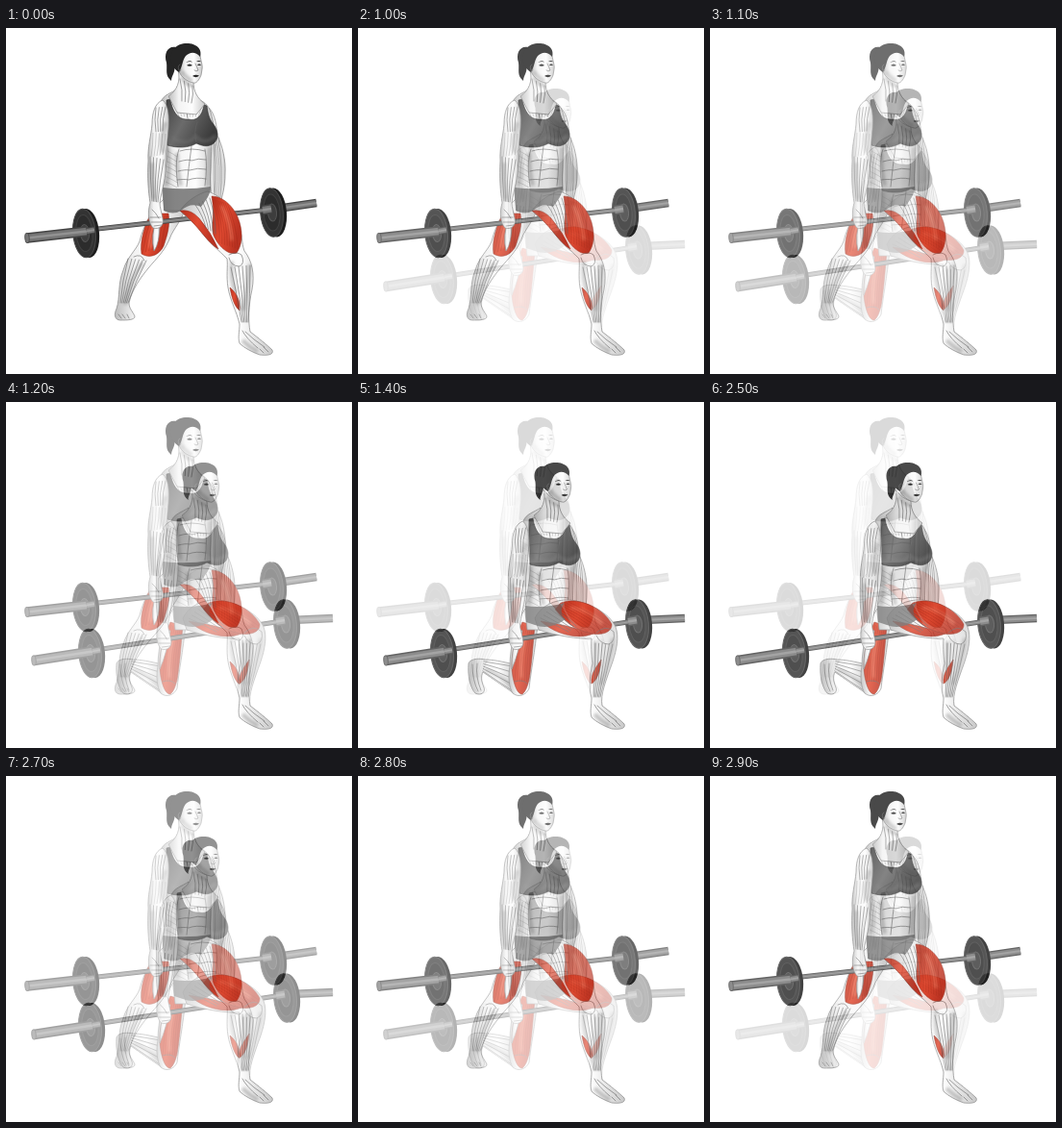
Write an HTML page that moves like this. It is 360 px wide and 360 px high and loops after 3 s.

```html
<!DOCTYPE html>
<html lang="en">
<head>
<meta charset="utf-8">
<title>Barbell split squat</title>
<style>
  html, body { margin: 0; width: 100%; height: 100%; overflow: hidden; background: #fff; }
  svg { display: block; width: 100vw; height: 100vh; }
  .skin { fill: url(#skin); stroke: #858585; stroke-width: .7; }
  .red { fill: url(#red); stroke: #8d2a1c; stroke-width: .5; }
  .dark { fill: url(#cloth); stroke: #2c2c2c; stroke-width: .6; }
  .hair { fill: #252525; }
  .ink { fill: none; stroke: #666; stroke-width: .6; stroke-linecap: round; }
  .fine { fill: none; stroke: #777; stroke-width: .45; opacity: .75; }
  .fibre { fill: none; stroke: #8e2115; stroke-width: .5; opacity: .55; }
  .glow { fill: none; stroke: #f98b70; stroke-width: 3; opacity: .6; filter: url(#soft); }
  .shade { fill: none; stroke: #777; stroke-width: 4; opacity: .4; filter: url(#soft); }
  .shorts { fill: #666; opacity: .78; }
</style>
</head>
<body>
<svg viewBox="0 0 360 360">
  <defs>
    <linearGradient id="skin">
      <stop offset="0" stop-color="#bcbcbc"/><stop offset=".28" stop-color="#f3f3f3"/>
      <stop offset=".65" stop-color="#fdfdfd"/><stop offset="1" stop-color="#c9c9c9"/>
    </linearGradient>
    <linearGradient id="red" x2="1" y2=".4">
      <stop offset="0" stop-color="#b52e1c"/><stop offset=".5" stop-color="#e04a31"/>
      <stop offset="1" stop-color="#b93221"/>
    </linearGradient>
    <linearGradient id="cloth" x2="1" y2=".5">
      <stop offset="0" stop-color="#434343"/><stop offset=".45" stop-color="#6b6b6b"/>
      <stop offset="1" stop-color="#3b3b3b"/>
    </linearGradient>
    <filter id="soft" x="-50%" y="-50%" width="200%" height="200%"><feGaussianBlur stdDeviation="1.4"/></filter>
  </defs>
  <g id="stand"></g>
  <g id="lunge"></g>
</svg>
<script>
const path = (type, d) => `<path class="${type}" d="${d}"/>`;
const move = (x, y, art) => `<g transform="translate(${x} ${y})">${art}</g>`;

// Evenly spread strands from segment a-b to segment c-d, bowed sideways.
function strands(type, [ax, ay, bx, by], [cx, cy, dx, dy], count, bow = 0) {
  let d = '';
  for (let i = 0; i < count; i++) {
    const k = i / (count - 1), mix = (p, q) => p + (q - p) * k;
    const x1 = mix(ax, bx), y1 = mix(ay, by), x2 = mix(cx, dx), y2 = mix(cy, dy);
    d += `M${x1} ${y1}Q${(x1 + x2) / 2 + bow} ${(y1 + y2) / 2} ${x2} ${y2}`;
  }
  return path(type, d);
}

const rod = (x1, y1, x2, y2, width) => [['#444', 1], ['#757575', .72], ['#929292', .25]]
  .map(([color, part]) => `<line x1="${x1}" y1="${y1}" x2="${x2}" y2="${y2}" stroke="${color}" stroke-width="${width * part}"/>`).join('');

const disc = (x, y, rx, ry, fill, stroke = 'none') =>
  `<ellipse rx="${rx}" ry="${ry}" transform="translate(${x} ${y}) rotate(-5)" fill="${fill}" stroke="${stroke}"/>`;

const plate = (x, y) => disc(x + 2, y, 12, 25.5, '#1d1d1d') + disc(x - 1.5, y, 11.8, 25.3, '#333', '#494949') +
  disc(x - 1.5, y, 8.6, 19, '#2c2c2c', '#414141') + disc(x - 1, y, 4.5, 9, '#3d3d3d', '#555');

function barbell(left, nearPlate, farPlate, right) {
  const [nx, ny] = nearPlate, [fx, fy] = farPlate;
  return rod(fx + 4, fy - 4, ...right, 8.5) + plate(fx, fy) +
    rod(nx + 8, ny - 4, fx - 5, fy - 3, 5) + rod(fx - 11, fy - 2.5, fx - 2, fy - 4, 10) +
    plate(nx, ny) + rod(...left, nx + 1, ny - 2, 10.5) + disc(left[0], left[1], 2.2, 5.1, '#777', '#505050') +
    rod(nx + 1, ny - 2, nx + 9, ny - 3.5, 7);
}

const head =
  path('hair', 'M177 20C168 18 164 27 167 36C168 44 165 49 172 55C172 49 177 46 175 39Z') +
  path('skin', 'M186 26C192 22 200 23 202 29C203 35 205 40 204 43L203 49C201 54 198 58 195 57C189 56 182 51 180 45C179 38 182 31 186 26Z') +
  path('shade', 'M183 45Q187 52 194 55') +
  path('hair', 'M172 36C169 22 179 15 190 16C200 17 204 23 202 30C197 24 191 25 187 29C183 34 184 40 180 46C176 43 173 41 172 36Z') +
  path('ink', 'M181 38q-3 1-1 6q2 2 2-1M197 37q2 4 3 7q-2 2-4 0') +
  path('hair', 'M187 36q4-3 7-.5q-3-1-7 .5M198 35q3-2 5 0M188 39q3-3 6 0q-3 1.5-6 0M199 38.5q2-2 4 0q-2 1.2-4 0') +
  path('hair', 'M194 50q3-2 7-.5q-3 3-7 .5');

const neck =
  path('skin', 'M179 44C182 55 178 65 169 71L178 88L198 90L207 79C199 73 195 66 195 56Q186 54 179 44Z') +
  path('shade', 'M183 51Q188 60 195 60') +
  strands('ink', [181, 53, 194, 60], [183, 76, 193, 78], 4, 2);

const torso =
  path('skin', 'M179 63C172 68 164 69 161 77C163 90 168 105 168 122C169 140 163 155 163 172L165 190L206 190L213 170C212 158 213 140 214 122C219 110 216 98 213 88C211 80 205 76 199 74L188 78Z') +
  path('shade', 'M168 124Q171 145 167 164M212 124Q210 145 210 165M178 130Q178 150 182 164') +
  path('ink', 'M171 73Q180 76 187 80Q197 77 207 80M187 80L189 94') +
  strands('fine', [174, 77, 204, 80], [180, 92, 200, 93], 8) +
  path('ink', 'M193 123Q190 145 188 165M181 128Q193 124 207 128M180 139Q190 136 193 138Q200 135 208 137M179 149Q187 147 191 148Q199 145 208 147M178 158Q186 157 190 158Q198 155 208 157') +
  path('ink', 'M180 126C176 138 177 150 179 165M207 126Q210 142 207 164') +
  strands('fine', [168, 128, 166, 160], [178, 134, 178, 166], 7, 1) +
  path('dark', 'M167 75L171 74C173 88 180 96 190 95C198 97 204 92 206 80L209 81C210 88 211 94 215 99C221 106 222 115 216 120C210 125 203 122 198 120C190 125 178 125 168 122C169 108 166 92 167 75Z') +
  path('shade', 'M173 114Q188 124 197 113Q207 123 218 112') +
  path('ink', 'M198 119Q195 108 199 98');

const nearArm =
  path('skin', 'M163 75C155 78 152 88 152 100C151 112 147 125 148 138C147 155 148 170 150 182C147 192 148 203 153 208C159 210 165 206 163 198C162 192 160 187 160 182C162 168 167 155 166 142C166 130 168 118 169 105C170 92 169 80 163 75Z') +
  path('shade', 'M166 98Q160 116 163 130M152 140Q152 160 154 178') +
  strands('ink', [156, 83, 166, 82], [156, 108, 163, 107], 4, -2) +
  strands('fine', [153, 109, 166, 110], [151, 134, 163, 132], 5, 1) +
  strands('ink', [150, 134, 164, 137], [152, 180, 158, 181], 5, -1) +
  path('ink', 'M152 189Q156 192 159 198M150 197l11 0M151 202l11 0M154 206l8-1');

const farArm =
  path('skin', 'M211 83C218 90 219 102 220 112C225 122 229 138 228 152C228 165 225 175 222 186L213 186C214 170 212 160 213 148C214 130 210 110 208 95Z') +
  path('shade', 'M216 120Q216 150 217 172') +
  strands('ink', [215, 106, 221, 114], [217, 176, 223, 176], 4, 4);

const foot = 'C262 322 272 330 277 335C279 340 272 341 264 340C256 337 248 333 243 328C241 322 243 316 243 308';
const toes = path('ink', 'M246 315Q250 323 262 333M264 334l4 4M268 332l5 5M249 316Q257 324 269 332') + path('shade', 'M246 325Q253 332 262 337');

const standBack =
  path('skin', 'M164 178C152 190 143 205 139 222C135 232 126 238 122 252C116 266 119 280 115 292C112 298 113 304 119 304C126 304 134 304 134 300C132 295 128 292 128 286C131 272 140 260 148 250C156 240 166 232 172 215C178 204 184 198 186 188Z') +
  path('red', 'M151 193C144 205 139 222 141 235C149 240 159 237 164 227C168 215 171 205 169 193Z') +
  path('glow', 'M154 204Q149 218 150 229') +
  strands('fibre', [152, 195, 168, 195], [142, 234, 162, 228], 7, -2) +
  path('skin', 'M157 198Q150 216 154 232Q160 224 160 202Z') +
  path('shade', 'M142 244Q128 264 124 288') +
  strands('ink', [127, 240, 146, 242], [119, 286, 127, 286], 6, -2) +
  path('ink', 'M133 238q8-4 11 4M117 298l3 4M121 298l3 4M126 298l2 4');

const standFront =
  path('skin', 'M210 170C222 174 236 186 241 200C246 214 245 224 248 232C256 242 259 256 256 272C252 290 252 305 254 316' + foot + 'C240 295 233 283 231 270C229 258 231 248 230 240C222 232 210 222 203 212C196 202 186 196 181 190C188 180 200 172 210 170Z') +
  path('red', 'M181 190Q192 188 201 198Q213 212 221 230C208 222 201 206 181 190Z') +
  path('red', 'M214 175C227 175 239 188 243 202C247 216 245 227 240 234C232 237 222 228 217 218C212 208 218 198 214 175Z') +
  path('glow', 'M224 185Q234 202 235 221') +
  strands('fibre', [215, 178, 230, 182], [222, 224, 241, 230], 8, 5) +
  strands('ink', [197, 184, 212, 177], [208, 208, 218, 214], 5, 3) +
  path('shade', 'M235 243Q233 260 239 276M253 246Q253 264 247 294') +
  path('red', 'M233 270C240 276 244 283 243 294C238 290 235 282 233 270Z') +
  path('ink', 'M232 236q8-4 13 0q4 9-2 12q-9 0-11-9') +
  strands('ink', [234, 249, 254, 247], [245, 306, 252, 306], 6, 1) + toes;

const lungeBack =
  path('skin', 'M163 273C150 270 140 268 132 268C124 266 116 268 115 272C114 284 116 296 122 303C128 306 133 302 131 297C128 290 128 285 130 281C140 288 152 296 162 303Z') +
  path('shade', 'M132 278Q148 284 160 296') +
  strands('ink', [131, 270, 130, 280], [161, 275, 160, 300], 5) +
  path('ink', 'M119 273Q119 290 125 301M124 272Q122 286 128 300') +
  path('skin', 'M174 215C164 230 158 255 158 275C156 285 157 297 161 303C167 308 175 305 178 298C180 280 184 260 187 232Z') +
  path('red', 'M171 229C162 246 158 270 161 286C163 296 166 304 171 304C178 298 179 284 181 266L184 233Z') +
  path('glow', 'M174 243Q168 266 170 287') +
  strands('fibre', [172, 232, 183, 236], [163, 291, 178, 291], 7, -3) +
  path('skin', 'M168 237Q159 256 160 278Q167 262 171 238Z') +
  path('ink', 'M163 291q8-3 13 2');

const lungeFront =
  path('skin', 'M184 225C190 212 205 205 220 206C240 208 262 220 268 234C272 244 269 258 265 270C258 290 252 304 254 316' + foot + 'C240 296 241 285 244 272C242 262 243 252 243 246C230 247 205 243 188 237Z') +
  path('red', 'M190 228Q214 231 245 241C229 248 206 242 190 228Z') +
  path('red', 'M211 209C229 202 255 214 264 231C265 240 252 244 240 240C226 237 214 228 205 216Z') +
  path('glow', 'M221 214Q241 216 254 231') +
  strands('fibre', [219, 208, 207, 217], [263, 233, 239, 239], 7, 4) +
  strands('ink', [203, 212, 190, 225], [227, 233, 219, 239], 5, 1) +
  path('shade', 'M247 249Q246 266 245 286M265 246Q263 266 253 294') +
  path('red', 'M253 268C248 276 242 282 243 293C249 290 252 280 253 268Z') +
  path('ink', 'M248 240q10-9 18-1q2 10-5 13q-9 0-13-9') +
  strands('ink', [247, 251, 265, 252], [245, 307, 252, 307], 6, 1) + toes;

const white = '<rect width="360" height="360" fill="#fff"/>';
const stand = document.getElementById('stand');
const lunge = document.getElementById('lunge');

stand.innerHTML = white + standBack + farArm +
  barbell([22, 218.5], [83, 213.5], [278, 192], [323, 182]) + torso + standFront +
  path('shorts', 'M163 166Q188 169 213 165C213 174 207 180 203 186Q192 181 182 190Q174 195 164 190Z') +
  neck + head + nearArm;

lunge.innerHTML = white + lungeBack + move(10, 47, farArm) +
  barbell([29, 269], [89, 261.5], [292, 231], [340, 225]) + move(11, 47, torso) + lungeFront +
  path('shorts', 'M174 212Q194 215 215 209C210 216 211 222 216 226Q199 238 184 232L175 229Z') +
  move(14, 47, neck) + move(17.5, 47, head) + move(8.5, 49, nearArm);

// Hard dissolve steps: [time in ms, sixths of the lowered pose].
const dissolve = [[0, 0], [1000, 1], [1100, 2], [1200, 3], [1300, 4], [1400, 5], [1500, 6],
  [2500, 5], [2600, 4], [2700, 3], [2800, 2], [2900, 1], [3000, 0]];
lunge.animate(
  dissolve.map(([time, sixths]) => ({ offset: time / 3000, opacity: sixths / 6, easing: 'step-end' })),
  { duration: 3000, iterations: Infinity }
);
</script>
</body>
</html>
```
